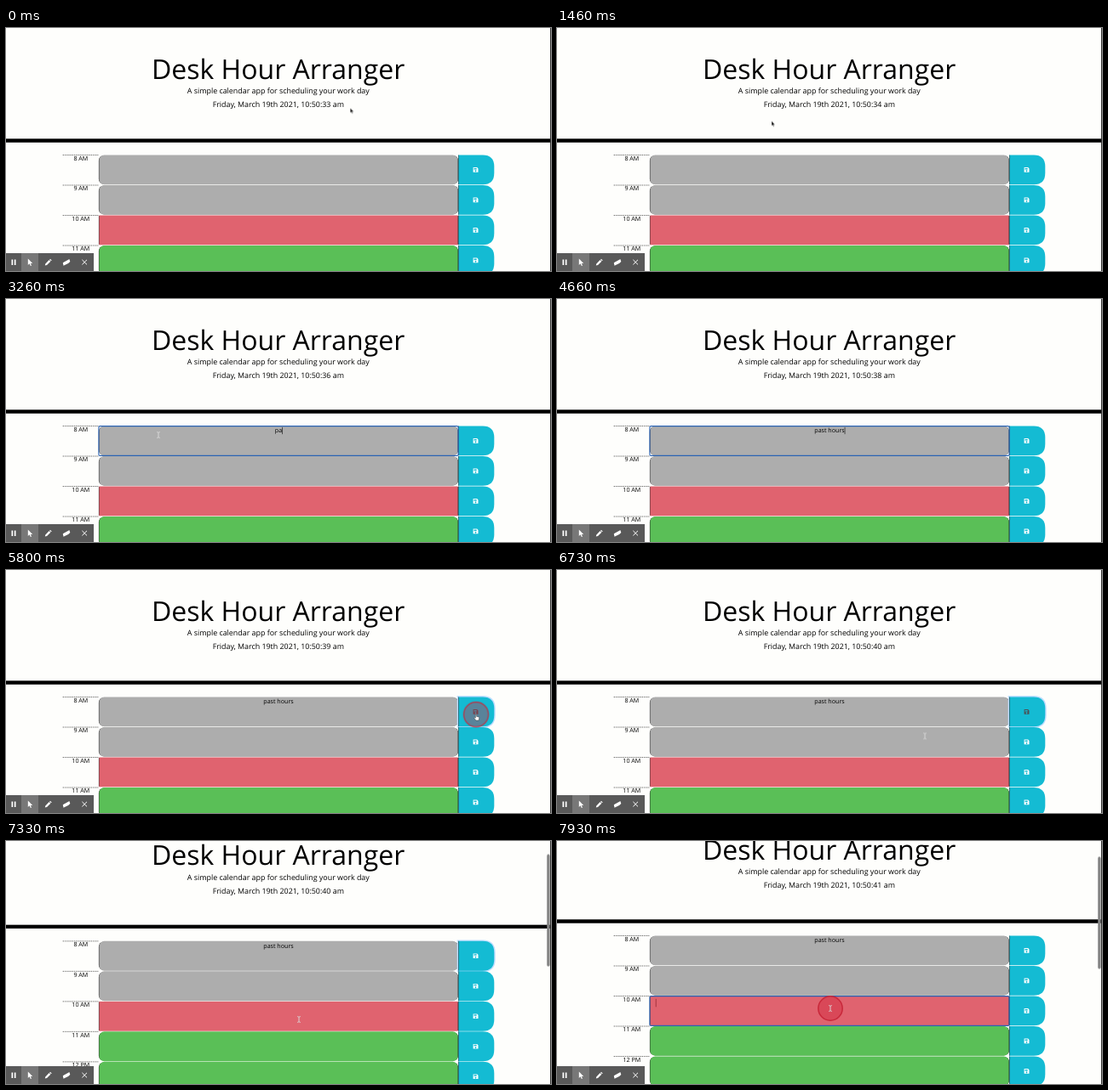
These frames come from a looping animation (640x286 px, 8 s). An HTML page:

```html
<!DOCTYPE html>
<html lang="en">
<head>
<meta charset="utf-8">
<title>Desk Hour Arranger</title>
<style>
  html, body { margin: 0; width: 100%; height: 100%; overflow: hidden; background: #fefefc; }
  svg { display: block; width: 640px; height: 286px; }
  text { font-family: "Open Sans", sans-serif; font-size: 7.11px; text-anchor: middle; text-rendering: geometricPrecision; }
  .title { font-size: 32px; }
  .lead { font-size: 8.89px; }
  .rule { stroke: #333; stroke-width: .7; stroke-dasharray: 1.3 .9; }
  .edge { fill: #222; }
  .past { fill: #adadad; }
  .present { fill: #e0636f; }
  .future { fill: #5abf57; }
  .save { fill: #14bbd3; }
  .icon { fill: #fff; fill-rule: evenodd; }
  .ring { fill: none; stroke: #2a63b4; stroke-width: 1.1; }
  .glow { fill: none; stroke: #bfdeff; stroke-width: 2.8; }

  #page, #thumb, #cursor, #ripple { animation: 8s infinite; }
  #page { animation-name: scroll; }
  #thumb { animation-name: thumb; }
  #cursor { animation-name: move; animation-timing-function: ease-in-out; }
  #ripple { animation-name: ripple; animation-timing-function: linear; }
  #arrow, #beam, #hand, #bar, #ring0, #ring2, #glow0, #icon0 { animation: 8s step-end infinite; }
  #arrow { animation-name: arrow; }
  #beam { animation-name: beam; }
  #hand { animation-name: hand; }
  #bar { animation-name: bar; }
  #ring0 { animation-name: ring0; }
  #ring2 { animation-name: ring2; }
  #glow0 { animation-name: glow; }
  #icon0 { animation-name: hover; }

  @keyframes scroll {
    0%, 87% { transform: translateY(0); animation-timing-function: cubic-bezier(.215, .61, .355, 1); }
    97.5%, 100% { transform: translateY(-38px); }
  }
  @keyframes thumb {
    0%, 87% { transform: translateY(0); animation-timing-function: cubic-bezier(.215, .61, .355, 1); }
    97.5%, 100% { transform: translateY(17.5px); }
  }
  @keyframes move {
    0%, 4% { transform: translate(404.3px, 94.2px); }
    18.2%, 20% { transform: translate(252px, 109.5px); }
    28%, 60.5% { transform: translate(179px, 160px); }
    70%, 82% { transform: translate(552px, 170px); animation-timing-function: ease-in; }
    84.1% { transform: translate(433.5px, 195px); animation-timing-function: ease-out; }
    86.2% { transform: translate(385px, 208px); }
    91.6% { transform: translate(344px, 210px); }
    97%, 100% { transform: translate(321px, 197px); }
  }
  @keyframes ripple {
    0%, 28.9% { opacity: 0; transform: scale(.8); }
    29%, 71%, 98.2% { opacity: 1; transform: scale(.8); }
    30%, 72%, 99.1% { opacity: 1; transform: scale(1); }
    33%, 75% { opacity: 0; transform: scale(1.1); }
    70.9%, 98.1% { opacity: 0; transform: scale(.8); }
    100% { opacity: 1; transform: scale(1); }
  }
  @keyframes arrow { 0% { visibility: visible; } 25.3%, 100% { visibility: hidden; } }
  @keyframes beam {
    0% { visibility: hidden; }
    25.3% { visibility: visible; }
    43.5% { visibility: hidden; }
    60.5% { visibility: visible; }
    68.5% { visibility: hidden; }
    82.7%, 100% { visibility: visible; }
  }
  @keyframes hand { 0% { visibility: hidden; } 68.5% { visibility: visible; } 82.7%, 100% { visibility: hidden; } }
  @keyframes bar { 0% { visibility: hidden; } 87%, 100% { visibility: visible; } }
  @keyframes ring0 { 0% { visibility: hidden; } 29% { visibility: visible; } 71%, 100% { visibility: hidden; } }
  @keyframes ring2 { 0% { visibility: hidden; } 98.2%, 100% { visibility: visible; } }
  @keyframes glow { 0% { visibility: hidden; } 71% { visibility: visible; } 98.2%, 100% { visibility: hidden; } }
  @keyframes hover { 0% { fill: #fff; } 68.5% { fill: #4a5257; } 84.9%, 100% { fill: #fff; } }
</style>
</head>
<body>
<svg viewBox="0 0 640 286">
  <rect width="640" height="286" fill="#fefefc"/>
  <g id="page">
    <text class="title" x="319.6" y="60">Desk Hour Arranger</text>
    <text class="lead" x="319.8" y="77.2">A simple calendar app for scheduling your work day</text>
    <text class="lead" id="clock" x="319.8" y="93.2"></text>
    <rect y="130.3" width="640" height="4.44"/>
    <g id="rows"></g>
    <text id="note" x="320" y="157.3"></text>
    <rect id="caret" width=".7"/>
  </g>

  <rect x="639" width="1" height="286" fill="#333"/>
  <g id="bar"><rect id="thumb" x="635.2" y="1" width="3.4" height="132" rx="1.7" fill="#858585"/></g>

  <g id="toolbar">
    <rect y="265" width="103" height="21" fill="#595959"/>
    <rect x="18" y="265" width="20" height="21" fill="#777"/>
    <path d="M6.5 272.5h1.7v6.5h-1.7zM9.8 272.5h1.7v6.5h-1.7z" fill="#fff"/>
    <path d="M25.8 271.5v7.4l1.8-1.6 1.2 2.7 1.2-.6-1.2-2.5h2.4z" fill="#fff"/>
    <path d="M45.8 279.6l.5-2.2 4.3-4.3 1.7 1.7-4.3 4.3zM51.1 272.6l.9-.9 1.7 1.7-.9.9z" fill="#fff"/>
    <path d="M66.8 276.2l7.6-4.2 .9 2.9-2.2 2-5.6 2.8z" fill="#fff"/>
    <path d="M89.4 272.8l5.6 5.6m0-5.6l-5.6 5.6" stroke="#fff" stroke-width="1"/>
  </g>

  <g id="cursor">
    <g id="ripple"><circle r="14.2" fill="#d0293c" fill-opacity=".45" stroke="#c8283a" stroke-width="1.5"/></g>
    <path id="arrow" d="M0 0v5.6l1.3-1.1 .8 1.9 .9-.4-.8-1.8h1.7z" fill="#111" stroke="#fff" stroke-width=".35"/>
    <path id="beam" d="M-1.8 -3.4q1.8 0 1.8 1v4.8q0 1-1.8 1M1.8 -3.4q-1.8 0-1.8 1M1.8 3.4q-1.8 0-1.8-1" fill="none" stroke="#dcdcdc" stroke-width=".9"/>
    <path id="hand" d="M-.6 0q.6-.8 1.2 0v2.4l2.6.6q.6.2.5 1l-.5 3h-3.4l-2.2-3q.2-.9 1.8.2z" fill="#fff" stroke="#222" stroke-width=".4"/>
  </g>
</svg>
<script>
  const LOOP = 8000, TOP = 149.3, PITCH = 35.5;
  const TYPE_START = 3000, KEY_MS = 160, NOTE = "past hours";
  const FOCUS = 2320, SAVE = 5680, REFOCUS = 7856;
  const $ = id => document.getElementById(id);

  const button = "M531.1 .2H559.8q13.5 0 13.5 13.5V21.5q0 13.5-13.5 13.5H531.1z";
  const floppy = "M548.6 14.8h4.6l1.3 1.3v4.3h-5.9zM549.5 15.6v1.5h3.2v-1.5zM551.5 18a.9 .9 0 1 0 .01 0z";
  const hours = [["8 AM", "past"], ["9 AM", "past"], ["10 AM", "present"], ["11 AM", "future"], ["12 PM", "future"]];

  $("rows").innerHTML = hours.map(([label, state], i) => {
    const r = state === "present" ? 0 : 6;
    return `<g transform="translate(0 ${TOP + i * PITCH})">
      <path class="rule" d="M66.7 .2H108.9"/>
      <text x="87.8" y="6.6">${label}</text>
      <rect class="edge" x="108.9" y=".8" width="422.2" height="33.6" rx="${r}"/>
      <rect class="${state}" x="109.4" y=".2" width="421.2" height="34.8" rx="${r}"/>
      <path class="glow" id="glow${i}" d="${button}" visibility="hidden"/>
      <path class="save" d="${button}"/>
      <path class="edge" d="M531 .2h.5v34.8h-.5z"/>
      <path class="icon" id="icon${i}" d="${floppy}"/>
      <rect class="ring" id="ring${i}" x="108.9" y=".3" width="422.2" height="34.8" rx="1.5" visibility="hidden"/>
    </g>`;
  }).join("");

  const clock = $("clock"), note = $("note"), caret = $("caret");

  function setText(node, s) {
    if (node.textContent !== s) node.textContent = s;
  }

  function placeCaret(x, y, h, color, idle) {
    const attrs = { x, y, height: h, fill: color, visibility: idle % 1000 < 500 ? "visible" : "hidden" };
    for (const k in attrs) caret.setAttribute(k, attrs[k]);
  }

  function draw(t) {
    setText(clock, `Friday, March 19th 2021, 10:50:${33 + Math.floor((t + 500) / 1000)} am`);
    const typed = Math.max(0, Math.min(NOTE.length, 1 + Math.floor((t - TYPE_START) / KEY_MS)));
    setText(note, NOTE.slice(0, typed));

    if (t >= REFOCUS) {
      placeCaret(115.8, TOP + 2 * PITCH + 3.5, 9.5, "#8a1f2b", t - REFOCUS);
    } else if (t < FOCUS || t >= SAVE) {
      caret.setAttribute("visibility", "hidden");
    } else if (!typed) {
      placeCaret(115.8, TOP + 3.5, 9.5, "#222", t - FOCUS);
    } else {
      const lastKey = TYPE_START + (typed - 1) * KEY_MS;
      placeCaret(320 + note.getComputedTextLength() / 2, TOP + 1.6, 8.2, "#222", t - lastKey);
    }
  }

  let start;
  function tick(now) {
    start ??= now;
    draw((now - start) % LOOP);
    requestAnimationFrame(tick);
  }
  draw(0);
  requestAnimationFrame(tick);
</script>
</body>
</html>
```
